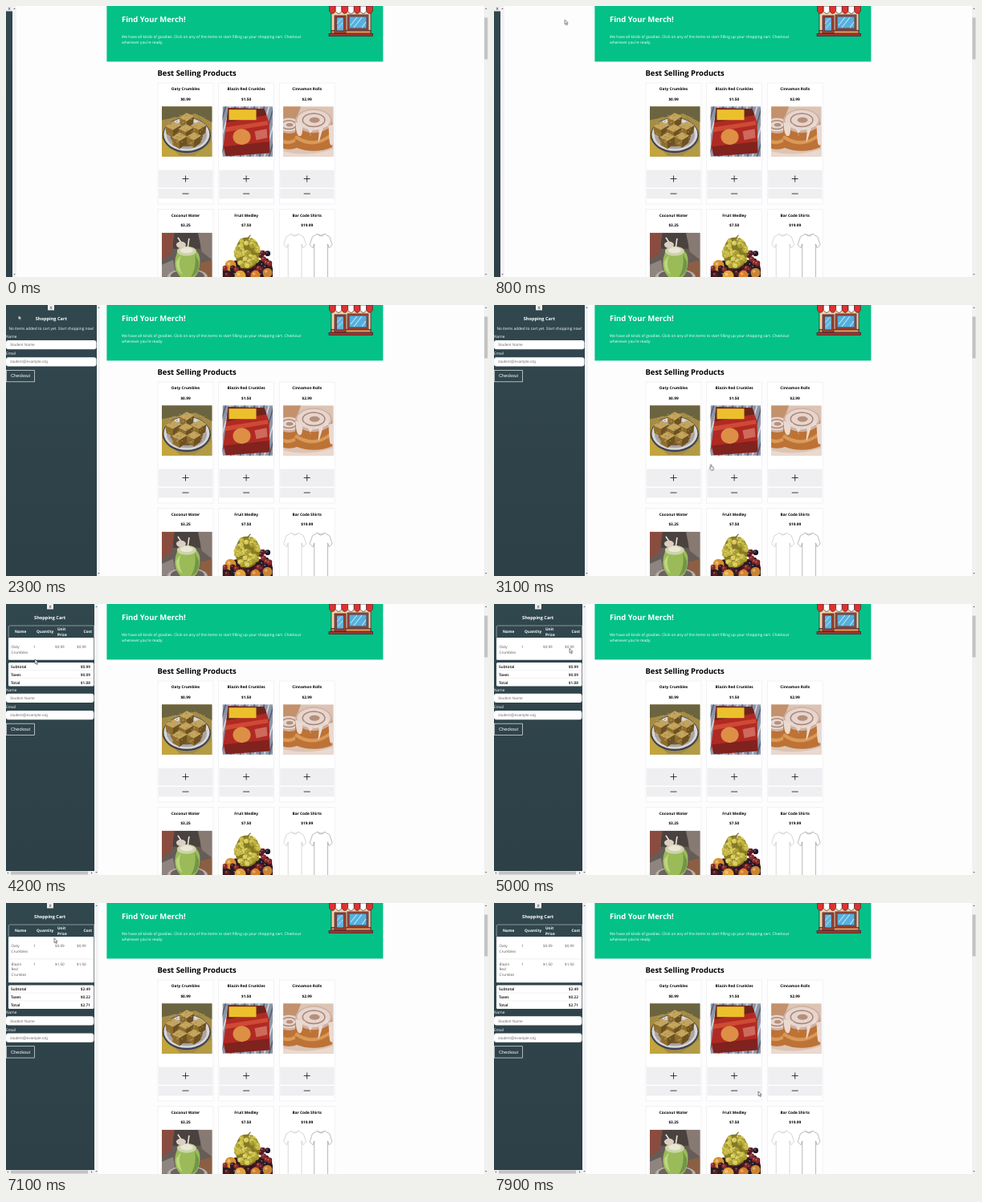
An HTML page for the animation above (8 s loop, 600 px wide and 338 px high).

```html
<!DOCTYPE html>
<html lang="en">
<head>
<meta charset="utf-8">
<title>Merch store</title>
<style>
html, body { margin: 0; width: 100%; height: 100%; overflow: hidden; background: #fff; }
svg { position: absolute; left: 0; top: 0; display: block; }
text { font-family: "Open Sans", "Noto Sans", sans-serif; text-rendering: geometricPrecision; }
.b { font-weight: 700; }
.m { font-weight: 600; }
.c { text-anchor: middle; }
.r { text-anchor: end; }
.ui { font-family: "Liberation Sans", Arial, sans-serif; }
#stage { position: relative; width: 600px; height: 338px; overflow: hidden; }
#side, #bar, #hbar { position: absolute; top: 0; left: 0; height: 338px; overflow: hidden; }
#side { width: 8px; background: linear-gradient(#31474e, #2d3f47); animation: open 8s infinite; }
#bar { left: 8px; width: 4.5px; background: #f3f2f4; animation: slide 8s infinite; }
#close { left: 50%; margin-left: -4px; }
#hbar { top: 333px; width: 110px; height: 5px; background: #f1f1f1; opacity: 0; animation: filled 8s step-end infinite; }
.state { opacity: 0; animation: 8s step-end infinite; }
#empty { animation-name: empty; }
#one { animation-name: one; }
#two { animation-name: two; }
#cursor { animation: travel 8s infinite ease-in-out; }
#arrow { animation: arrow 8s step-end infinite; }
#hand { opacity: 0; animation: hand 8s step-end infinite; }

@keyframes open {
  0%, 20.6% { width: 8px; }
  26.9%, 46.24% { width: 112.5px; }
  46.25%, 100% { width: 110px; }
}
@keyframes slide {
  0%, 20.6% { left: 8px; }
  26.9%, 46.24% { left: 112.5px; }
  46.25%, 100% { left: 110px; }
}
@keyframes empty { 0% { opacity: 0 } 20.7% { opacity: 1 } 46.25%, 100% { opacity: 0 } }
@keyframes one { 0% { opacity: 0 } 46.25% { opacity: 1 } 81.25%, 100% { opacity: 0 } }
@keyframes two { 0% { opacity: 0 } 81.25%, 100% { opacity: 1 } }
@keyframes filled { 0% { opacity: 0 } 46.25%, 100% { opacity: 1 } }
@keyframes arrow { 0% { opacity: 0 } 1.25% { opacity: 1 } 36.5% { opacity: 0 } 41.5%, 100% { opacity: 1 } }
@keyframes hand { 0% { opacity: 0 } 36.5% { opacity: 1 } 41.5%, 100% { opacity: 0 } }
@keyframes travel {
  0%, 1.25% { transform: translate(598px, 60px); }
  12% { transform: translate(50px, 14px); }
  16%, 18.75% { transform: translate(4px, 9px); }
  20%, 27% { transform: translate(3.5px, 4px); }
  38.75% { transform: translate(268.5px, 198.5px); }
  43.5%, 47% { transform: translate(223px, 215px); }
  52.5% { transform: translate(36px, 69px); }
  56.5% { transform: translate(13px, 54px); }
  62% { transform: translate(94px, 54px); }
  66% { transform: translate(94px, 96px); }
  69% { transform: translate(60px, 97px); }
  72.5% { transform: translate(114px, 101px); }
  79.5%, 82% { transform: translate(299px, 214px); }
  88.75% { transform: translate(60px, 44px); }
  91% { transform: translate(66px, 62px); }
  98.75%, 100% { transform: translate(329px, 235px); }
}
</style>
</head>
<body>
<div id="stage">
  <svg id="page" width="600" height="338"></svg>
  <div id="side">
    <svg id="cart" width="113" height="338"></svg>
    <svg id="close" width="8" height="6.5">
      <rect width="8" height="6.5" fill="#efefef"/>
      <text class="ui c" x="4" y="4.9" font-size="4.6">X</text>
    </svg>
  </div>
  <div id="bar"><svg id="barArt" width="5" height="338"></svg></div>
  <div id="hbar"><svg id="hbarArt" width="110" height="5"></svg></div>
  <svg width="600" height="338">
    <g id="cursor">
      <path id="arrow" d="M0 0V5.6L1.3 4.4 2.3 6.6 3.3 6.1 2.3 4H4.1Z" fill="#fff" stroke="#222" stroke-width=".55"/>
      <path id="hand" d="M1 .6Q1.8 0 2.1.8V3L4.4 3.5Q5 3.8 4.8 5L4.3 7.4H1.7L-.2 5Q-.3 4 .9 4.6Z" fill="#fff" stroke="#222" stroke-width=".6"/>
    </g>
  </svg>
</div>
<script>
const $ = id => document.getElementById(id);
const text = (x, y, s, cls = '', size = 4.78, fill = '#000') =>
  `<text x="${x}" y="${y}" class="${cls}" font-size="${size}" fill="${fill}">${s}</text>`;
const rect = (x, y, w, h, fill, more = '') =>
  `<rect x="${x}" y="${y}" width="${w}" height="${h}" fill="${fill}" ${more}/>`;
const oval = (x, y, rx, ry, fill, more = '') =>
  `<ellipse cx="${x}" cy="${y}" rx="${rx}" ry="${ry}" fill="${fill}" ${more}/>`;
const path = (d, fill, stroke = 'none', w = 1) =>
  `<path d="${d}" fill="${fill}" stroke="${stroke}" stroke-width="${w}"/>`;
const tri = (x, y, d) => path(`M${x} ${y}${d}z`, '#606060');

let seed = 7;
const rnd = () => (seed = seed * 16807 % 2147483647) / 2147483647;
const scatter = (n, draw) => Array.from({ length: n }, (_, i) => draw(i)).join('');

// Pictures, each in a 62.5 x 63 box
const cube = (x, y, s) => `<g transform="translate(${x} ${y}) scale(${s})">` +
  path('M-8-2 0 2 0 10-7 6z', '#8f6f2e') + path('M0 2 8-3 7 5 0 10z', '#6d5120') +
  path('M-8-2 0-7 8-3 0 2z', '#c3a45c') + '</g>';

function treats() {
  return rect(0, 0, 63, 63, '#a58c45') + path('M0 0H63V20L42 9 0 17z', '#6b6440') +
    path('M0 40 24 63H0z', '#c3a43d') + path('M63 44V63H38z', '#b39b45') +
    oval(31, 36, 30, 22, '#3a4258') + oval(31, 35, 28.5, 20.5, '#d9d6d3') +
    oval(31, 36, 25, 17, '#aaa5a5') + oval(31, 37, 20, 13, '#765a34') +
    cube(31, 16, 1.15) + cube(14, 27, 1.2) + cube(46, 27, 1.2) + cube(30, 30, 1.15) + cube(22, 41, 1.2) + cube(40, 40, 1.15) +
    scatter(90, () => oval(9 + rnd() * 44, 11 + rnd() * 37, .9, .6, rnd() < .5 ? '#dcc07c' : '#7d5c26', 'opacity=".6"'));
}
function chips() {
  return rect(0, 0, 63, 63, '#8e96a6') +
    scatter(14, i => path(`M${i * 6 - 14} 63l18-63`, 'none', i % 2 ? '#d5d8de' : '#545e75', 1.6)) +
    path('M7 2 52 3 58 20 59 58 4 62 1 50z', '#b02a23') + path('M7 2 52 3 55 11 5 20z', '#6e241c') +
    rect(8, 4, 34, 13, '#ecc02c') + path('M4 26 56 18 57 23 3 32z', '#cf4a35') +
    path('M2 50 58 44 59 58 4 62z', '#80221e') + oval(24, 38, 11, 10, '#dd8f45') +
    path('M40 31 55 28 56 39 42 42z', '#ce6a5c');
}
const roll = (x, y, w, h) => path(`M${x - w} ${y}V${y + h}Q${x} ${y + h + 9} ${x + w} ${y + h}V${y}z`, '#bd7236') +
  path(`M${x - w} ${y + h * .6}Q${x} ${y + h + 3} ${x + w} ${y + h * .5}`, 'none', '#d99a57', 4) +
  oval(x, y, w, w * .65, '#cfb0a0') + oval(x, y - 1, w * .9, w * .54, '#e6d5ce') +
  oval(x, y - 1, w * .6, w * .36, 'none', 'stroke="#a98472" stroke-width="1.5"') +
  oval(x + 1, y - 1, w * .28, w * .15, '#b58f7b');
function rolls() {
  return rect(0, 0, 63, 63, '#dcc4b4') + path('M0 0H22L14 22 0 26z', '#c3916c') +
    roll(7, 24, 15, 25) + roll(38, 18, 23, 33) +
    path('M15 19q1 17 5 18t4-10 6 0 4 9 5-8 5 10 5-9 8 7 16-17L38 30z', '#e9dad2') +
    path('M0 56Q30 64 63 53V63H0z', '#ead9d0');
}
function coconut() {
  return rect(0, 0, 63, 63, '#665c57') + rect(14, 0, 34, 20, '#4a423e') +
    path('M0 0H16L12 26 0 34z', '#8a4c3f') + path('M45 0H63V34L50 24z', '#877a73') +
    path('M0 40 14 34 18 55H0z', '#8f8580') + path('M48 38 63 34V56H46z', '#8c5f43') +
    oval(32, 55, 25, 10, '#b9b0ab') + oval(32, 54, 21, 8, '#6b6360') +
    path('M19 25Q13 40 20 51T33 58Q45 57 47 42T43 23Q30 16 19 25z', '#9abb58') +
    path('M24 28Q19 40 26 53 17 47 18 36z', '#bdd682') + path('M41 26Q44 42 36 56 48 50 46 36z', '#73944a') +
    oval(31, 23, 12, 6, '#cdd3aa') + oval(31, 22, 8, 3.5, '#e9e8d4') +
    path('M30 21 20 6 M32 21 34 7', 'none', '#e9e3dc', 1.6) + oval(24, 15, 6, 4, '#dccfc2');
}
function fruit() {
  const ball = (x, y, r, c) => oval(x, y, r, r, c) + oval(x - r * .3, y - r * .3, r * .3, r * .3, '#fff', 'opacity=".35"');
  const berries = ['#3a1420', '#5d1c22', '#20182c', '#8b2a28'];
  return rect(0, 0, 63, 63, '#fff') + path('M0 46Q8 34 22 34H46Q60 34 63 46V63H0z', '#2c1b1e') +
    ball(10, 41, 7, '#d8912f') +
    scatter(12, i => ball(45 + rnd() * 14, 24 + rnd() * 18, 3.4, berries[i % 4])) +
    scatter(32, i => ball(3 + rnd() * 56, 42 + rnd() * 17, 3.2, berries[i % 4])) +
    ball(22, 54, 7, '#e2a33a') + ball(41, 53, 6, '#d87f2a') + ball(56, 50, 6, '#c98432') +
    path('M22 8Q34 2 43 12 50 26 41 40 30 50 20 40 11 24 22 8z', '#857a25') +
    scatter(60, i => { const y = 9 + i * .55, spread = 8 + 7 * Math.sin(i / 19);
      return ball(31 + (rnd() - .5) * 2 * spread, y, 2.9, ['#c4b840', '#d9cb5c', '#a59a2c'][i % 3]); }) +
    path('M32 10Q31 6 35 3', 'none', '#7c6931', 1.2);
}
const shirt = (x, w, ink) => path(`M${x + w * .34} 1.5Q${x + w / 2} 5 ${x + w * .66} 1.5L${x + w * .88} 5 ${x + w} 15 ${x + w * .86} 19 ${x + w * .8} 14V63H${x + w * .2}V14L${x + w * .14} 19 ${x} 15 ${x + w * .12} 5z`, '#fff', ink, .6) +
  path(`M${x + w * .34} 1.5Q${x + w / 2} 7 ${x + w * .66} 1.5`, 'none', ink, .5);
const shirts = () => rect(0, 0, 63, 63, '#fff') + shirt(.5, 28, '#bdbdbd') + shirt(33, 28, '#8c8c8c');

const items = [
  ['Oaty Crumbles', '0.99', treats], ['Blazin Red Crunkles', '1.50', chips], ['Cinnamon Rolls', '2.99', rolls],
  ['Coconut Water', '3.25', coconut], ['Fruit Medley', '7.50', fruit], ['Bar Code Shirts', '19.99', shirts]
];

function card([name, price, art], i) {
  const x = 189 + (i % 3) * 75.6, y = 96 + (i / 3 | 0) * 157.6, mid = 34.5;
  return `<g transform="translate(${x} ${y})">` +
    rect(0, 0, 69, 151, '#fff', 'stroke="#ececee" stroke-width=".7"') +
    text(mid, 9.2, name, 'b c') + text(mid, 21.8, '$' + price, 'b c') +
    `<svg x="4.9" y="29.2" width="62.5" height="62.6">${art()}</svg>` +
    rect(1, 108.6, 67.2, 22, '#efeef0') + rect(1, 132, 67.2, 12.3, '#efeef0') +
    path('M30.5 119.5h8M34.5 115.5v8M30.5 138.1h8', 'none', '#111', .8) + '</g>';
}

function store() {
  const line = 'stroke="#4a2430" stroke-width=".8"';
  const stripes = scatter(7, i => path(`M${402.5 + i * 7.7} 0h7.7v6.5q-3.8 6-7.7 0z`, i % 2 ? '#fff' : '#e0322f', '#4a2430', .7));
  return rect(405, 3, 49, 31, '#f0d2a6', line) + rect(405, 30.5, 49, 4, '#c9834c', line) +
    rect(409, 12, 14, 22, '#a9442f', line) + rect(411.3, 14, 9.4, 17, '#62b4dc', line) +
    path('M412 22l6-7M413 28l6-7', 'none', '#b8e5f5', 1) +
    rect(425, 11, 26, 19, '#b9573a', line) + rect(427, 13, 22, 15, '#55b0dd', line) +
    path('M429 24l8-10M433 27l10-13M443 27l5-7', 'none', '#b8e5f5', 1.2) +
    rect(402, 34.5, 54.5, 3, '#a8362d', line) + stripes;
}

$('page').innerHTML = rect(0, 0, 600, 338, '#fefdfe') + rect(125.4, 0, 344, 69.4, '#04c187') +
  text(144, 20.2, 'Find Your Merch!', 'b', 9.5, '#fff') +
  text(144, 40, 'We have all kinds of goodies. Click on any of the items to start filling up your shopping cart. Checkout', '', 4.78, '#fff') +
  text(144, 46.5, "whenever you're ready.", '', 4.78, '#fff') + store() +
  text(188.5, 86.6, 'Best Selling Products', 'b', 9.45) + items.map(card).join('') +
  rect(595, 0, 5, 338, '#f1f1f1') + rect(595.5, 14.5, 4, 52, '#c1c1c1') +
  tri(596.3, 4, 'h2.4l-1.2-1.5') + tri(596.3, 334, 'h2.4l-1.2 1.5');

$('barArt').innerHTML = tri(1.3, 4, 'h2.4l-1.2-1.5') + tri(1.3, 334, 'h2.4l-1.2 1.5');
$('hbarArt').innerHTML = rect(6, .5, 96, 4, '#c1c1c1') + tri(3, 1.3, 'v2.4l-1.5-1.2') + tri(106, 1.3, 'v2.4l1.5-1.2');

// Sidebar in its three states
function form(y, w) {
  const field = (label, hint, at) => text(0, at, label, '', 4.78, '#fff') +
    rect(0, at + 3, w, 11.2, '#fff', 'rx="3"') + text(5, at + 10.2, hint, 'ui', 4.8, '#757575');
  return field('Name', 'Student Name', y) + field('Email', 'student@example.org', y + 21.2) +
    rect(.4, y + 40.4, 35, 14.4, 'none', 'stroke="#e8ecee" stroke-width=".7"') +
    text(6, y + 49.4, 'Checkout', 'ui', 5.7, '#fff');
}
const title = x => text(x, 18.7, 'Shopping Cart', 'b c', 5.6, '#fff');

function filled(id, bought, sums) {
  let y = 42, rows = '';
  bought.forEach(([name, price], i) => {
    const words = name.split(' '), base = y + (i ? 7.8 : 13);
    words.forEach((w, k) => rows += text(6.5, base + k * 6.6, w, '', 4.6, '#555'));
    rows += text(34, base, '1', '', 4.6, '#555') + text(61, base, price, '', 4.6, '#555') + text(88, base, price, '', 4.6, '#555');
    if (i) rows += path(`M3 ${y}H109`, 'none', '#e4e4e4', .6);
    y += i ? 29.5 : 27.8;
  });
  const top = y + 3.2, white = '#fff';
  const totals = ['Subtotal', 'Taxes', 'Total'].map((s, i) =>
    text(6, top + 6.6 + i * 10, s, 'm') + text(105, top + 6.6 + i * 10, sums[i], 'm r') +
    (i ? path(`M3 ${top + i * 10 - .4}H109`, 'none', '#e4e4e4', .5) : '')).join('');
  return `<g class="state" id="${id}">` + title(54.7) +
    path('M3.2 42V29Q3.2 27 5.2 27H109.6V42', 'none', '#c3cbcf', .6) +
    text(11, 36.4, 'Name', 'b', 4.78, white) + text(38, 36.4, 'Quantity', 'b', 4.78, white) +
    text(64, 33, 'Unit', 'b', 4.78, white) + text(64, 39.6, 'Price', 'b', 4.78, white) +
    text(107, 36.4, 'Cost', 'b r', 4.78, white) +
    rect(3, 42, 106.4, y - 42, white, 'rx="1"') + rows +
    rect(3, top, 106.4, 29.5, white, 'rx="1.5"') + totals + form(top + 35.8, 109.4) + '</g>';
}

const first = [items[0][0], '$0.99'], second = [items[1][0], '$1.50'];
$('cart').innerHTML = `<g class="state" id="empty">` + title(56.3) +
  text(56.3, 31.4, 'No items added to cart yet. Start shopping now!', 'c', 4.78, '#fff') + form(41, 112.5) + '</g>' +
  filled('one', [first], ['$0.99', '$0.09', '$1.08']) +
  filled('two', [first, second], ['$2.49', '$0.22', '$2.71']);
</script>
</body>
</html>
```
